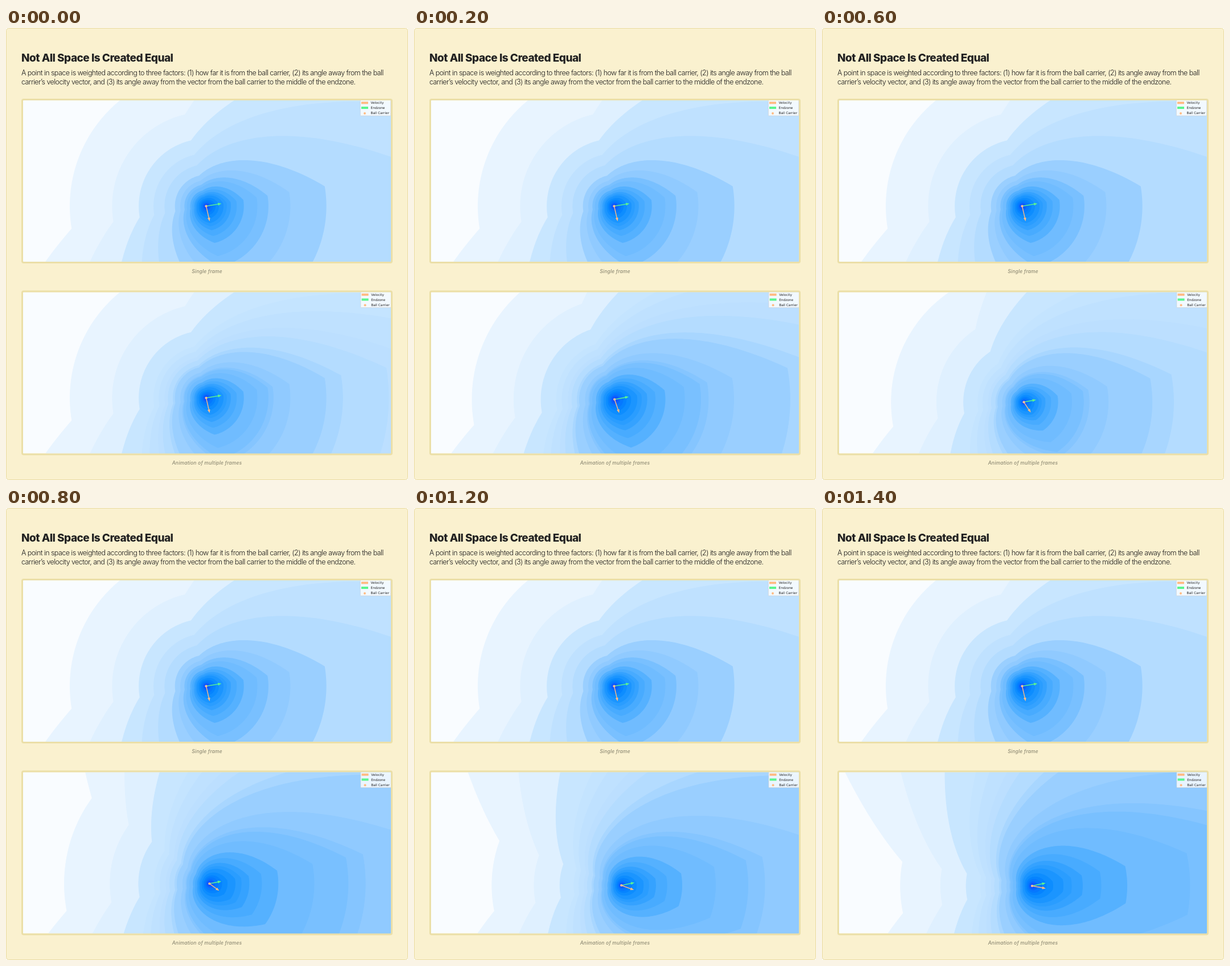
An HTML page that plays this animation: 706 px wide and 793 px high, repeating every 1.6 s.

```html
<!DOCTYPE html>
<html lang="en">
<head>
<meta charset="utf-8">
<title>Not All Space Is Created Equal</title>
<style>
  html, body { margin: 0; width: 100%; height: 100%; overflow: hidden; background: #fff; }
  svg { display: block; width: 706px; height: 793px; }
  text { font-family: Inter, "Open Sans", sans-serif; }
  .title { font-size: 19px; font-weight: 800; letter-spacing: -.52px; fill: #222; }
  .body { font-size: 12.5px; font-weight: 300; letter-spacing: -.565px; fill: #1c1c1c; }
  .caption { font-size: 8.5px; font-weight: 500; font-style: italic; letter-spacing: .18px; fill: #8f8b75; text-anchor: middle; }
  .key { font: 5.8px "DejaVu Sans", sans-serif; fill: #222; }
</style>
</head>
<body>
<svg id="stage" viewBox="0 0 706 793" xmlns="http://www.w3.org/2000/svg">
  <rect x=".5" y=".5" width="705" height="792" rx="4" fill="#faf1cf" stroke="#e9dca4"/>
  <text class="title" x="27" y="59">Not All Space Is Created Equal</text>
  <text class="body" x="27" y="83">A point in space is weighted according to three factors: (1) how far it is from the ball carrier, (2) its angle away from the ball</text>
  <text class="body" x="27" y="99">carrier’s velocity vector, and (3) its angle away from the vector from the ball carrier to the middle of the endzone.</text>
  <text class="caption" x="353" y="430">Single frame</text>
  <text class="caption" x="353" y="766">Animation of multiple frames</text>
</svg>
<script>
const NS = 'http://www.w3.org/2000/svg';
const stage = document.getElementById('stage');
const ORANGE = '#ffbb83', GREEN = '#5df58e';
const STEP = 200;
const SLOPE = 0.000354; // weight lost per degree of angle

// Weight thresholds and the fill inside each one
const LEVELS = [
  [.0125, '#e8f4ff'], [.0257, '#dff0ff'], [.0398, '#c8e6ff'], [.0519, '#bfe1ff'],
  [.0648, '#b4dcff'], [.0829, '#9acfff'], [.0963, '#90caff'], [.1097, '#79c0ff'],
  [.1195, '#70bcff'], [.137, '#55b1ff'], [.1505, '#48abff'], [.166, '#35a2ff'],
  [.18, '#2a9dff'], [.195, '#1b95ff'], [.225, '#0d8dff'], [.26, '#0583ff'],
  [.3, '#0578ff'], [.37, '#0866ff'], [.45, '#1054ff']
];
// The moving panel has soft in-between bands
const SOFT_LEVELS = [
  ...LEVELS.slice(0, 3), [.0519, '#c4e4ff'], [.0575, '#bfe1ff'], [.0648, '#bcdfff'],
  [.0699, '#b4dcff'], [.0786, '#a8d6ff'], ...LEVELS.slice(5, 7), [.106, '#85c5ff'],
  ...LEVELS.slice(7)
];

// Carrier x, y; velocity and endzone angles; arrow length; weight scale and offset
const POSES = [
  [351.5, 649, 77, -9.5, 27.2, 1, .0447],
  [352.2, 651.6, 71, -10.3, 25.2, .904, .0468],
  [353.3, 654.3, 64, -10.5, 23.2, .965, .0495],
  [354.5, 656.3, 56.3, -10.6, 21.8, 1.153, .0527],
  [357.3, 659, 36, -10.8, 21.2, .985, .0606],
  [359.7, 660.2, 29.8, -11, 22.4, 1.162, .062],
  [364.2, 662, 20, -11.4, 23.4, 1.09, .0637],
  [369, 663, 10.5, -11.9, 24.4, .99, .0662]
];

function add(parent, tag, attrs, text) {
  const el = document.createElementNS(NS, tag);
  for (const name in attrs) el.setAttribute(name, attrs[name]);
  if (text) el.textContent = text;
  return parent.appendChild(el);
}

const rad = deg => deg * Math.PI / 180;
const gap = (a, b) => Math.abs(((a - b) % 360 + 540) % 360 - 180);

function contour(level, [x, y, vel, end, , scale, offset]) {
  const angles = [vel, end, vel - 180, end + 180];
  for (let a = -180; a < 180; a += 1.5) angles.push(a);
  angles.sort((a, b) => a - b);
  const points = angles.map(a => {
    const u = level * scale - offset + SLOPE * (gap(a, vel) + gap(a, end));
    const r = u > .02 ? 1 / (u * u) : 2500;
    return (x + r * Math.cos(rad(a))).toFixed(2) + ' ' + (y + r * Math.sin(rad(a))).toFixed(2);
  });
  return 'M' + points.join('L') + 'Z';
}

function makeArrow(parent, color) {
  const shaft = add(parent, 'path', { stroke: color, 'stroke-width': 1.4, fill: 'none' });
  const head = add(parent, 'path', { fill: color });
  return (x, y, angle, length) => {
    const turn = `translate(${x} ${y}) rotate(${angle})`;
    shaft.setAttribute('d', `M0 0H${length - 5}`);
    head.setAttribute('d', `M${length} 0l-6.2 -2.4v4.8Z`);
    shaft.setAttribute('transform', turn);
    head.setAttribute('transform', turn);
  };
}

function makeLegend(parent, x, y) {
  const g = add(parent, 'g', { transform: `translate(${x} ${y})` });
  add(g, 'rect', { x: .3, y: -2, width: 53.4, height: 29, rx: 1, fill: '#fff', 'fill-opacity': .8, stroke: '#ccc', 'stroke-width': .6 });
  add(g, 'rect', { x: 2, y: 2.3, width: 12, height: 4, fill: ORANGE });
  add(g, 'rect', { x: 2, y: 11, width: 12, height: 4, fill: GREEN });
  add(g, 'circle', { cx: 8, cy: 22.7, r: 2, fill: ORANGE });
  ['Velocity', 'Endzone', 'Ball Carrier'].forEach((label, i) =>
    add(g, 'text', { class: 'key', x: 18.6, y: 6.3 + 8.9 * i }, label));
}

function makePanel(id, top, levels, legendX) {
  const clip = add(stage, 'clipPath', { id });
  const area = { x: 30, y: top, width: 646, height: 283 };
  add(clip, 'rect', area);
  const g = add(stage, 'g', { 'clip-path': `url(#${id})` });
  add(g, 'rect', { ...area, fill: '#f9fcff' });
  const bands = levels.map(([, fill]) => add(g, 'path', { fill }));
  const endArrow = makeArrow(g, GREEN);
  const velArrow = makeArrow(g, ORANGE);
  const dot = add(g, 'circle', { r: 2.1, fill: '#ffc09a' });
  makeLegend(g, legendX, top);
  add(stage, 'rect', { x: 28.5, y: top - 1.5, width: 649, height: 286, rx: 2.5, fill: 'none', stroke: '#ebdfa8', 'stroke-width': 3 });
  return pose => {
    const [x, y, vel, end, length] = pose;
    bands.forEach((band, i) => band.setAttribute('d', contour(levels[i][0], pose)));
    endArrow(x, y, end, length);
    velArrow(x, y, vel, length);
    dot.setAttribute('cx', x);
    dot.setAttribute('cy', y);
  };
}

const drawStill = makePanel('still', 127, LEVELS, 622);
const drawMoving = makePanel('moving', 463.5, SOFT_LEVELS, 622.6);
const [x0, y0, ...rest] = POSES[0];
drawStill([x0, y0 - 336.5, ...rest]);

let shown = -1;
const start = performance.now();
function update(now) {
  const index = Math.floor(Math.max(0, now - start) / STEP) % POSES.length;
  if (index !== shown) drawMoving(POSES[shown = index]);
  requestAnimationFrame(update);
}
update(start);
</script>
</body>
</html>
```
